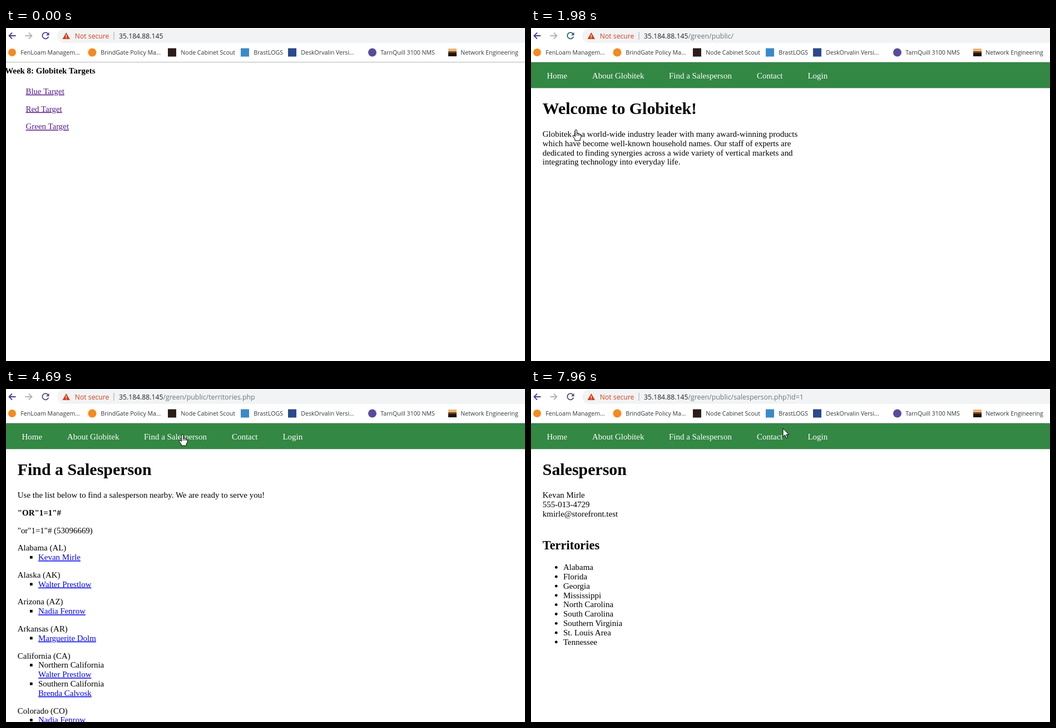
Recreate the animation shown at these times as an HTML page. Size 933x600 px, loop 8000 ms.

```html
<!DOCTYPE html>
<html lang="en">
<head>
<meta charset="utf-8">
<title>Browser walkthrough</title>
<style>
html, body { margin: 0; width: 100%; height: 100%; overflow: hidden; background: #fff; }
svg { display: block; }
text { font: 14.95px "Liberation Serif", serif; white-space: pre; }
.ui { font: 12.2px "Open Sans", sans-serif; fill: #202124; }
.warn { fill: #d23f1d; }
.path { font-size: 12.4px; fill: #70757a; }
.mark { font: 10.6px "Open Sans", sans-serif; fill: #333639; }
.bold { font-weight: bold; }
.h1 { font-size: 29.9px; font-weight: bold; }
.h2 { font-size: 22.4px; font-weight: bold; }
.nav { fill: #fff; }
.link { fill: #00e; text-decoration: underline; }
.seen { fill: #551a8b; text-decoration: underline; }
.pressed .seen:last-child { fill: #e00; }
.line { fill: none; stroke-width: 1.8; }
.cursor { fill: #fff; stroke: #000; stroke-linejoin: round; }
</style>
</head>
<body>
<svg id="stage" width="933" height="600" viewBox="0 0 933 600"></svg>
<script>
const LINE = 16.82, GAP = 31.75, LEFT = 20.8, INDENT = 58;
const text = (x, y, s, cls = "") => `<text x="${x}" y="${y}" class="${cls}">${s}</text>`;
const box = (x, y, w, h, fill, rx = 0) =>
  `<rect x="${x}" y="${y}" width="${w}" height="${h}" rx="${rx}" fill="${fill}"/>`;
const dot = (x, y, r, fill) => `<circle cx="${x}" cy="${y}" r="${r}" fill="${fill}"/>`;
const lines = (list, y) => list.map((s, i) => text(LEFT, y + i * LINE, s)).join("");

function toolbar() {
  const marks = [[26, "FenLoam Managem..."], [170, "BrindGate Policy Ma..."], [314, "Node Cabinet Scout"],
    [445, "BrastLOGS"], [530, "DeskOrvalin Versi..."], [673, "TarnQuill 3100 NMS"], [817, "Network Engineering"]];
  return box(0, 0, 933, 61, "#fff") + box(92, 1, 900, 26, "#f1f3f4", 13) +
    `<path class="line" stroke="#4b3a93" d="M17.5 14H6M11 8.5L5.5 14L11 19.5"/>
    <path class="line" stroke="#b3b3b3" d="M34.5 14H46M41 8.5L46.5 14L41 19.5"/>
    <g id="reload"><path class="line" stroke="currentColor" d="M75.6 10.6A5.6 5.6 0 1 0 76.3 15.6"/>
    <path fill="currentColor" d="M77.5 7.8V13.3H72Z"/></g>
    <path id="stop" class="line" stroke="#5f6368" d="M65.5 8.8L76.3 19.4M76.3 8.8L65.5 19.4"/>
    <path class="warn" d="M108.3 8L115 20H101.6Z"/>
    <path stroke="#fff" stroke-width="1.3" d="M108.3 12.2V16M108.3 17V18.4"/>` +
    text(123.8, 19, "Not secure", "ui warn") + box(193.5, 7, 1, 14, "#a5a9ad") +
    text(203, 19, '35.184.88.145<tspan id="path" class="path"></tspan>', "ui") +
    marks.map(([x, s]) => text(x + 0.3, 48, s, "mark")).join("") +
    dot(11, 44, 7, "#f58a1f") + dot(155, 44, 7.5, "#f58a1f") +
    box(291, 36.5, 15, 15, "#2b1d1a") + box(422, 36.5, 15, 15, "#3a8ac8") +
    box(507, 36.5, 15, 15, "#2a4a8c") + dot(658.5, 44, 7.5, "#5b4a9c") +
    box(795, 37, 15, 6, "#e3b877") + box(795, 42, 15, 4, "#7a3d1b") + box(795, 45, 15, 6, "#1d1410") +
    box(0, 61, 933, 1, "#b4b4b4");
}

const nav = box(0, 61.5, 933, 46.8, "#338844") +
  [[28.5, "Home"], [110, "About Globitek"], [248, "Find a Salesperson"], [406, "Contact"], [497.5, "Login"]]
    .map(([x, s]) => text(x, 90.5, s, "nav")).join("");
const heading = s => nav + text(LEFT, 155, s, "h1");

function home() {
  return text(-1.8, 82, "Week 8: Globitek Targets", "bold") +
    ["Blue", "Red", "Green"].map((s, i) => text(35.5, 118.8 + i * GAP, s + " Target", "seen")).join("");
}

function welcome() {
  return heading("Welcome to Globitek!") + lines([
    "Globitek is a world-wide industry leader with many award-winning products",
    "which have become well-known household names. Our staff of experts are",
    "dedicated to finding synergies across a wide variety of vertical markets and",
    "integrating technology into everyday life."], 196);
}

function finder() {
  let y = 196;
  let out = heading("Find a Salesperson") +
    text(LEFT, y, "Use the list below to find a salesperson nearby. We are ready to serve you!") +
    text(LEFT, y += GAP, '"OR"1=1"#', "bold") + text(LEFT, y += GAP, '"or"1=1"# (53096669)');
  // Items starting with * carry a bullet; those with @ are links.
  const states = [["Alabama (AL)", "*@Kevan Mirle"], ["Alaska (AK)", "*@Walter Prestlow"],
    ["Arizona (AZ)", "*@Nadia Fenrow"], ["Arkansas (AR)", "*@Marguerite Dolm"],
    ["California (CA)", "*Northern California", "@Walter Prestlow", "*Southern California", "@Brenda Calvosk"],
    ["Colorado (CO)", "*@Nadia Fenrow"]];
  for (const [state, ...items] of states) {
    out += text(LEFT, y += GAP, state);
    for (const item of items) {
      y += LINE;
      if (item[0] === "*") out += box(43, y - 7.2, 4.7, 4.7, "#000");
      out += text(INDENT, y, item.replace(/[*@]/g, ""), item.includes("@") ? "link" : "");
    }
  }
  return out;
}

function person() {
  const areas = ["Alabama", "Florida", "Georgia", "Mississippi", "North Carolina", "South Carolina",
    "Southern Virginia", "St. Louis Area", "Tennessee"];
  return heading("Salesperson") + lines(["Kevan Mirle", "555-013-4729", "kmirle@storefront.test"], 196) +
    text(LEFT, 288.8, "Territories", "h2") +
    areas.map((s, i) => dot(45.3, 321.4 + i * LINE, 2.4, "#000") + text(INDENT, 326.2 + i * LINE, s)).join("");
}

const $ = id => document.getElementById(id);
const pages = [home, welcome, finder, person];
$("stage").innerHTML = pages.map((p, i) => `<g id="page${i}">${p()}</g>`).join("") + toolbar() +
  `<g id="pointer">
  <g id="ring" fill="none"><circle cx="-2" cy="-1" r="10.6" stroke="#000"/><circle cx="-2" cy="-1" r="9.6" stroke="#fff"/></g>
  <path id="arrow" class="cursor" d="M0 0V15L3.5 11.8L6 17.5L8.3 16.5L5.8 11H10.5Z"/>
  <path id="hand" class="cursor" d="M-1.6 1Q0 -1 1.6 1V7Q3.2 5.8 4.5 7.6Q6 6.8 7 8.4Q9 7.8 9 10V14L7.2 17V20H-2V17.5L-5.8 12Q-6 9.5 -4 10.4L-1.6 12.5ZM1.6 7V11M4.5 7.6V11M7 8.4V11"/>
  </g>`;

// Pointer moves: start, end, number of steps, way points.
const moves = [
  [130, 900, 11, [[1000, 675], [530, 400], [150, 200], [36, 129], [71, 173]]],
  [1130, 1210, 2, [[71, 173], [81, 183]]],
  [2430, 2830, 6, [[81, 183], [410, 107]]],
  [2990, 3790, 11, [[410, 107], [411, 108], [438, 124], [370, 110], [337, 82]]],
  [3870, 3950, 2, [[337, 82], [317, 82]]],
  [5220, 6010, 11, [[317, 82], [230, 190], [120, 315], [103, 306]]],
  [7640, 7960, 5, [[103, 306], [453, 71]]]
];
const within = (t, spans) => spans.some(([a, b]) => t >= a && t < b);
const stage = (t, times) => times.filter(a => t >= a).length;

function pointerAt(t) {
  const [from, to, n, pts] = moves.filter(m => t >= m[0]).pop();
  const step = Math.min(n, 1 + Math.floor((t - from) / (to - from) * (n - 1) + 1e-6));
  const u = step / n * (pts.length - 1), i = Math.min(Math.floor(u), pts.length - 2), f = u - i;
  return [0, 1].map(k => Math.round(pts[i][k] + (pts[i + 1][k] - pts[i][k]) * f));
}

const show = (id, on) => $(id).style.display = on ? "" : "none";

function draw(t) {
  const page = stage(t, [1980, 4590, 6710]);
  pages.forEach((_, i) => show("page" + i, i === page));
  $("path").textContent = ["", "/green/public/", "/green/public/territories.php",
    "/green/public/salesperson.php?id=1"][stage(t, [1910, 4510, 6630])];
  const loading = within(t, [[1650, 1980], [4350, 4690], [6550, 6710]]);
  show("stop", loading);
  show("reload", !loading);
  $("reload").style.color = ["#4b3a93", "#28606a", "#504d66", "#504d66"][page];
  $("page0").classList.toggle("pressed", within(t, [[1380, 1560]]));

  show("pointer", t >= 130);
  if (t < 130) return;
  $("pointer").setAttribute("transform", `translate(${pointerAt(t)})`);
  const hand = within(t, [[830, 2430], [3710, 5220], [6090, 7640]]);
  show("hand", hand);
  show("arrow", !hand);
  show("ring", within(t, [[1380, 1560], [4110, 4270], [6400, 6550]]));
}

const start = performance.now();
function tick() {
  draw((performance.now() - start) % 8000);
  requestAnimationFrame(tick);
}
tick();
</script>
</body>
</html>
```
